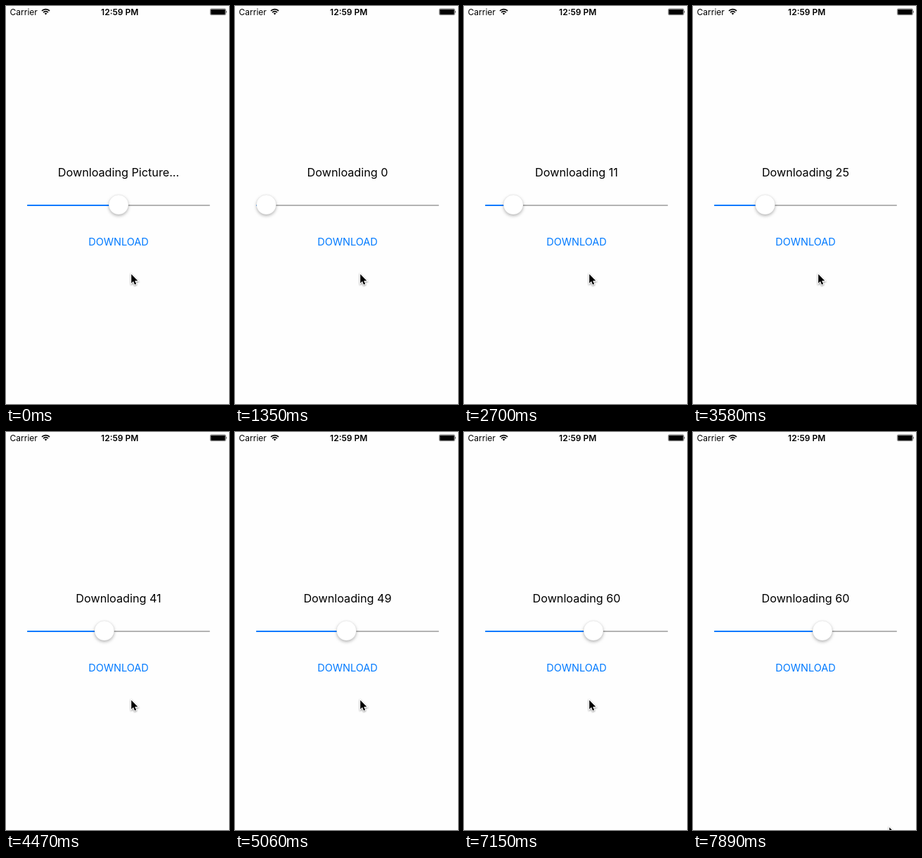
Animation of 317 by 565 pixels, one loop 8 s. Source, as an HTML page:

```html
<!DOCTYPE html>
<html>
<head>
<meta charset="utf-8">
<style>
html, body { margin: 0; width: 100%; height: 100%; overflow: hidden; background: #fefefe; }
svg { display: block; font-family: Inter, "Open Sans", sans-serif; }
#knob { filter: drop-shadow(0 2.7px 2px rgba(0,0,0,.28)); }
#cursor { filter: drop-shadow(0 1px .8px rgba(0,0,0,.45)); }
</style>
</head>
<body>
<svg width="317" height="565" viewBox="0 0 317 565">
  <text x="5.6" y="12.7" font-size="12">Carrier</text>
  <g fill="none" stroke="#000" stroke-width="1.7">
    <path d="M51 6.9a7.8 7.8 0 0 1 11 0M53.1 9.1a4.8 4.8 0 0 1 6.8 0"/>
    <path d="M54.7 10.5a2.6 2.6 0 0 1 3.6 0l-1.8 2z" fill="#000" stroke="none"/>
  </g>
  <text x="161.7" y="12.7" font-size="12" font-weight="600" text-anchor="middle">12:59 PM</text>
  <rect x="290.4" y="3.9" width="22" height="8.8" rx="1.6" fill="none" stroke="#000" stroke-width=".5"/>
  <rect x="291.2" y="4.7" width="20.4" height="7.2" rx=".8"/>
  <path d="M313.2 6.6q1.4 1.7 0 3.4z"/>
  <text id="label" x="160" y="242" font-size="16.2" text-anchor="middle"></text>
  <rect x="30" y="282" width="260" height="2" rx="1" fill="#b3b3b3"/>
  <rect id="bar" x="30" y="282" height="2" rx="1" fill="#007aff"/>
  <circle id="knob" cy="282" r="14" fill="#fff" stroke="rgba(0,0,0,.13)" stroke-width=".5"/>
  <text x="160" y="339.6" font-size="14.5" text-anchor="middle" fill="#007aff">DOWNLOAD</text>
  <path id="cursor" d="M0 0V12.6L2.8 10L4.8 14.6L6.9 13.7L5 9.2H9Z" stroke="#fff" stroke-width="2" paint-order="stroke"/>
</svg>
<script>
const $ = id => document.getElementById(id);
const LOOP = 8000, BEGIN = 1350, TICK = 148.4;
// [tick, percent]: download speed changes and stalls
const keys = [[0, 0], [9, 11], [15, 25], [21, 41], [25, 49], [29, 49], [31, 53],
  [32, 53], [33, 55], [35, 57], [36, 57], [39, 60], [44, 60]];

function percentAt(tick) {
  const i = Math.max(1, keys.findIndex(k => k[0] >= tick));
  const [t0, p0] = keys[i - 1], [t1, p1] = keys[i];
  return Math.round(p0 + (p1 - p0) * (tick - t0) / (t1 - t0));
}

function draw(now) {
  const tick = Math.floor((now % LOOP - BEGIN) / TICK);
  const idle = tick < 0;
  const percent = idle ? 49.7 : percentAt(tick);
  const x = 44.5 + 2.325 * percent;
  $("label").textContent = "Downloading " + (idle ? "Picture..." : percent);
  $("knob").setAttribute("cx", x);
  $("bar").setAttribute("width", x - 30);
  // the pointer leaves during the last five ticks
  const k = Math.max(0, (tick - 39) / 5);
  const ease = k * k * (3 - 2 * k);
  $("cursor").setAttribute("transform", `translate(${178.2 + 101 * ease} ${380.8 + 180.5 * ease})`);
}

const start = performance.now();
function frame() {
  draw(performance.now() - start);
  requestAnimationFrame(frame);
}
draw(0);
requestAnimationFrame(frame);
</script>
</body>
</html>
```
